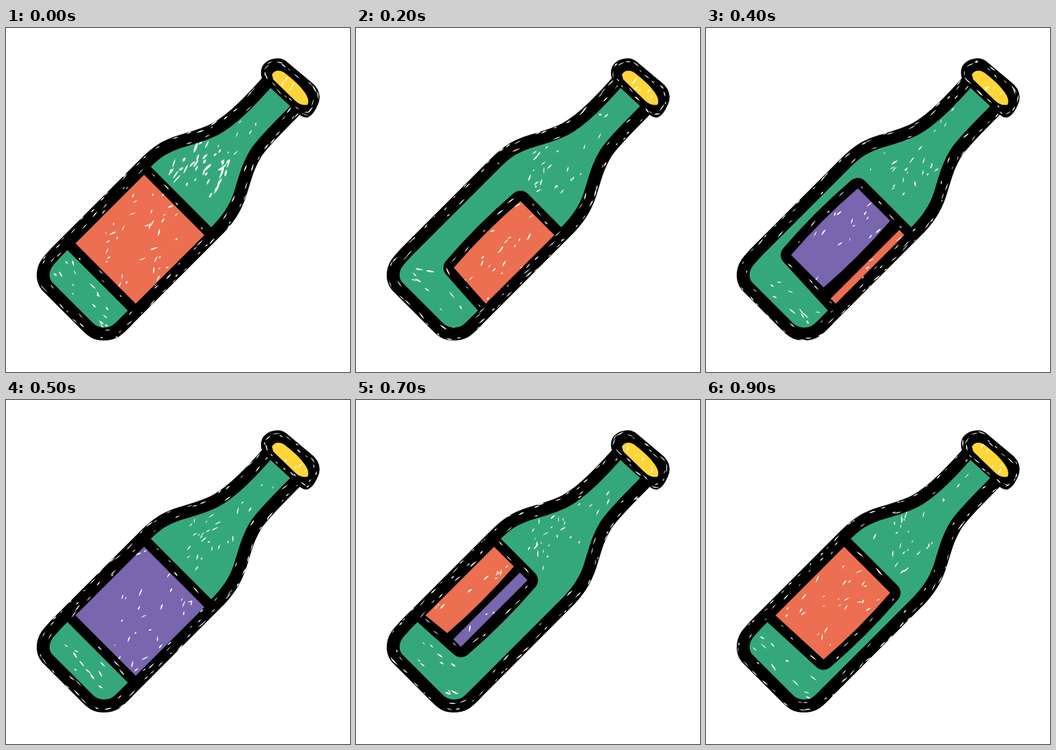
An HTML page with a canvas that plays this animation: 480x480 px, repeating every 1 s.

```html
<!DOCTYPE html>
<html lang="en">
<head>
<meta charset="utf-8">
<title>Bottle</title>
<style>
html, body { margin: 0; width: 100%; height: 100%; overflow: hidden; background: #fff; }
canvas { display: block; width: 480px; height: 480px; }
</style>
</head>
<body>
<canvas id="stage" width="480" height="480"></canvas>
<script>
const ctx = document.getElementById('stage').getContext('2d');
const GREEN = '#35a87b', RED = '#eb6f50', PURPLE = '#7866ae', YELLOW = '#fed639';
const STEP = 100;

const BOTTLE = 'M57 360 C49 350 50 335 61 323 L70 313 L194 189 C212 171 222 166 238 160 ' +
  'C256 154 275 150 292 141 C316 128 342 101 370 69 L410 108 C388 131 362 155 349 174 ' +
  'C338 192 335 205 329 224 C323 246 314 262 297 280 L170 407 C155 423 150 427 136 427 ' +
  'C125 427 119 422 113 416 Z';
const CAP = 'M356 66 Q354 50 369 44 Q384 39 393 48 L430 79 Q440 90 437 102 ' +
  'Q430 122 420 125 Q412 125 403 115 L363 78 Q357 73 356 66 Z';
const LID = 'M371 65 Q377 56 388 62 Q408 77 417 90 Q424 100 421 107 Q411 109 403 101 L373 72 Z';

// Label strips per step: near side, far side (measured across the bottle), colour
const LABELS = [
  [[281, 400, RED]],
  [[308, 400, RED]],
  [[333, 400, RED]],
  [[333, 346, PURPLE], [362, 400, RED]],
  [[308, 372, PURPLE], [390, 400, RED]],
  [[281, 400, PURPLE]],
  [[281, 288, RED], [307, 372, PURPLE]],
  [[281, 320, RED], [332, 347, PURPLE]],
  [[281, 346, RED]],
  [[281, 372, RED]]
];
const FOOT = -144, HEAD = -8.5;

let seed = 1;
function rnd(a = 0, b = 1) {
  seed = (seed * 1664525 + 1013904223) % 4294967296;
  return a + (b - a) * seed / 4294967296;
}

// s runs along the bottle, t across it
const at = (s, t) => [(s + t) * Math.SQRT1_2, (t - s) * Math.SQRT1_2];

function stripPath([near, far]) {
  const mid = (FOOT + HEAD) / 2;
  const inner = t => t > 300 && t < 380;
  const foot = t => FOOT + (inner(t) ? 4 : 0);
  const bow = t => (inner(t) && far - near > 30 ? 5 : 0);
  const p = (s, t) => at(s, t).map(n => n.toFixed(1)).join(' ');
  return `M${p(foot(near), near)} Q${p(mid, near - bow(near))} ${p(HEAD, near)} ` +
    `L${p(HEAD, far)} Q${p(mid, far + bow(far))} ${p(foot(far), far)} Z`;
}

function measure(d) {
  const el = document.createElementNS('http://www.w3.org/2000/svg', 'path');
  el.setAttribute('d', d);
  return el;
}

function fill(d, color) {
  ctx.fillStyle = color;
  ctx.fill(new Path2D(d));
}

function stroke(d, width) {
  ctx.strokeStyle = '#000';
  ctx.lineWidth = width;
  ctx.lineJoin = 'round';
  ctx.stroke(new Path2D(d));
}

function fleck(x, y, angle, len, wide) {
  ctx.save();
  ctx.translate(x, y);
  ctx.rotate(angle);
  ctx.fillStyle = '#fff';
  ctx.beginPath();
  ctx.moveTo(-len / 2, 0);
  ctx.quadraticCurveTo(rnd(-len, len) / 4, -wide, len / 2, 0);
  ctx.quadraticCurveTo(rnd(-len, len) / 4, wide * 0.8, -len / 2, 0);
  ctx.fill();
  ctx.restore();
}

// Unpainted dashes that follow a line; positive offsets lie outside it
function edgeFlecks(d, count, low, high) {
  const el = measure(d), total = el.getTotalLength();
  for (let i = 0; i < count; i++) {
    const pos = (i + rnd()) / count * total;
    const a = el.getPointAtLength(pos), b = el.getPointAtLength((pos + 2) % total);
    const angle = Math.atan2(b.y - a.y, b.x - a.x), off = rnd(low, high);
    fleck(a.x + Math.sin(angle) * off, a.y - Math.cos(angle) * off,
      angle + rnd(-0.12, 0.12), rnd(4, 13), rnd(1, 2));
  }
}

// Unpainted strokes scattered in a box that is turned with the bottle
function scatter(count, s0, s1, t0, t1, angle, spread, size) {
  for (let i = 0; i < count; i++) {
    const [x, y] = at(rnd(s0, s1), rnd(t0, t1));
    fleck(x, y, angle + rnd(-spread, spread), rnd(4, 13) * size, rnd(1.4, 2.8) * size);
  }
}

function clipped(d, paint) {
  ctx.save();
  ctx.clip(new Path2D(d));
  paint();
  ctx.restore();
}

function draw(step) {
  seed = 7919 * (step + 3);
  for (let i = 0; i < 5; i++) rnd();
  const strips = LABELS[step].map(strip => ({ d: stripPath(strip), strip }));
  const whole = stripPath([LABELS[step][0][0], LABELS[step].at(-1)[1]]);
  const bold = step === 0;

  ctx.fillStyle = '#fff';
  ctx.fillRect(0, 0, 480, 480);

  fill(BOTTLE, GREEN);
  clipped(BOTTLE, () => {
    scatter(bold ? 38 : 22, 18, 90, 298, 368, -1.05, bold ? 0.3 : 0.6, bold ? 1.4 : 0.85);
    scatter(bold ? 8 : 5, 90, 185, 320, 350, -1, 0.4, 0.8);
    scatter(bold ? 16 : 10, -200, -165, 290, 395, bold ? 0.95 : 0.6, 0.5, 1);
  });

  stroke(BOTTLE, 18);
  stroke(whole, 29);
  fill(whole, '#000');
  edgeFlecks(BOTTLE, 58, 4, 8.5);
  edgeFlecks(BOTTLE, 20, -7, -3);
  edgeFlecks(whole, 16, 3, 11);

  strips.forEach(({ d, strip: [near, far, color] }) => {
    fill(d, color);
    const count = Math.round((far - near) * (color === RED ? 0.3 : 0.22));
    clipped(d, () => scatter(count, FOOT, HEAD, near, far, -0.9, 0.65, 0.9));
  });

  fill(CAP, '#000');
  clipped(CAP, () => edgeFlecks(CAP, 20, -8, -2));
  fill(LID, YELLOW);
  clipped(LID, () => scatter(5, 216, 228, 312, 370, -0.95, 0.3, 0.95));
}

let shown = -1;
function tick() {
  const step = Math.floor(performance.now() % (STEP * LABELS.length) / STEP);
  if (step !== shown) draw(shown = step);
  requestAnimationFrame(tick);
}
tick();
</script>
</body>
</html>
```
